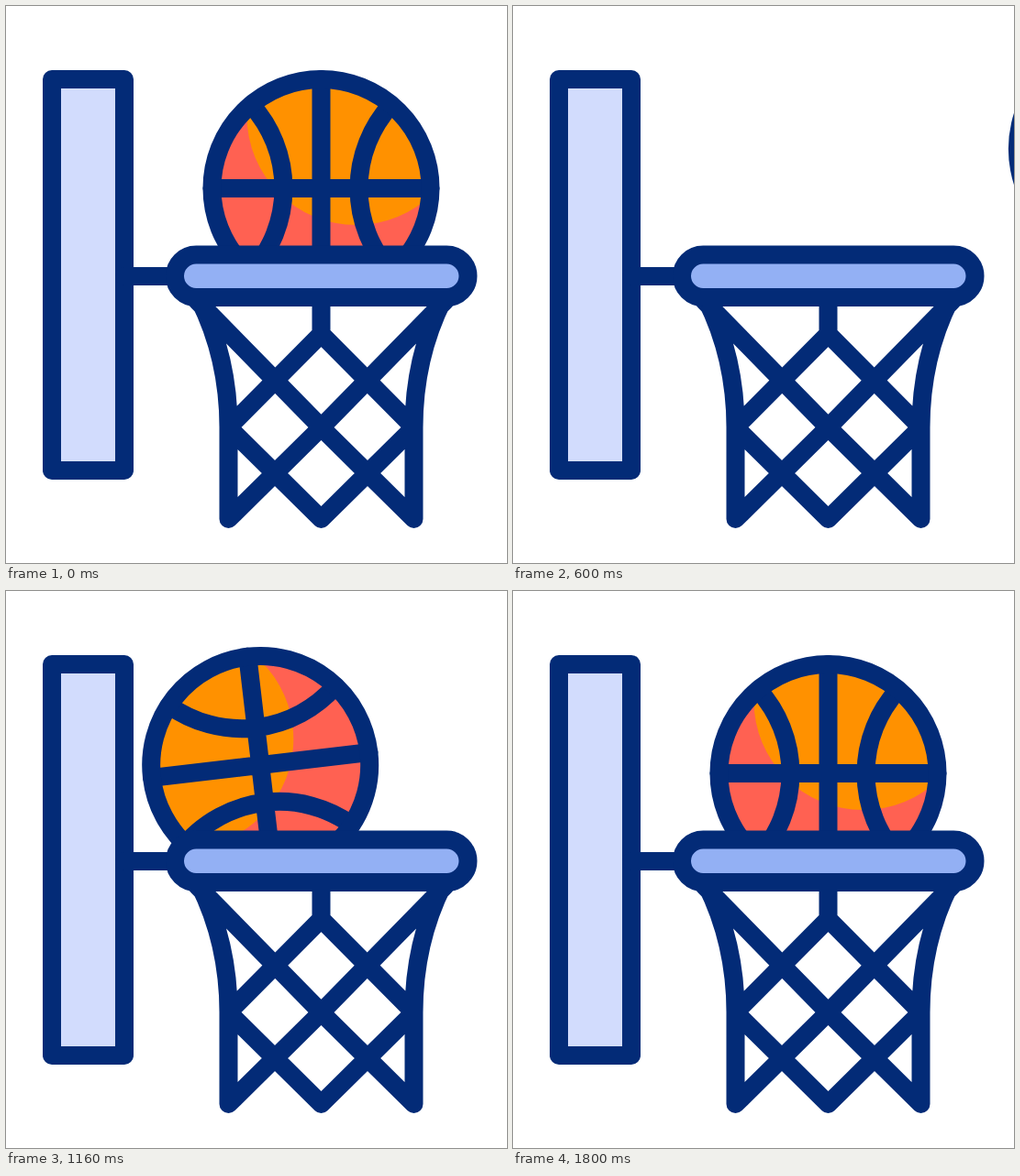
An HTML page that plays this animation: 546 px wide and 608 px high, repeating every 2000 ms.

```html
<!DOCTYPE html>
<html lang="en">
<head>
<meta charset="utf-8">
<title>Basketball hoop</title>
<style>
  html, body { margin: 0; width: 100%; height: 100%; overflow: hidden; background: #fff; }
  svg { display: block; width: 546px; height: 608px; }
  .line { fill: none; stroke: #032b77; stroke-width: 20; stroke-linecap: round; stroke-linejoin: round; }
</style>
</head>
<body>
<svg viewBox="0 0 546 608">
  <defs><clipPath id="inside"><circle r="119"/></clipPath></defs>
  <rect class="line" x="50" y="80" width="79" height="427" style="fill:#d2dcfd"/>
  <path class="line" d="M129 295H184"/>
  <g id="ball">
    <circle r="119" fill="#ff6152"/>
    <circle cx="38" cy="-79" r="119" fill="#ff9100" clip-path="url(#inside)"/>
    <path class="line" d="M0-119V119M-119 0H119M-76-91A136 136 0 0 1-76 91M76-91A136 136 0 0 0 76 91"/>
    <circle class="line" r="119"/>
  </g>
  <path class="line" id="net"/>
  <rect class="line" x="184" y="271.5" width="319.5" height="46.5" rx="23.25" style="fill:#93b0f4"/>
</svg>
<script>
const LOOP = 2000, STEP = 40, CENTER = 343.5;
const ball = document.getElementById('ball');
const net = document.getElementById('net');

const progress = (t, from, to) => Math.min(1, Math.max(0, (t - from) / (to - from)));
const smooth = u => u * u * (3 - 2 * u);
const mix = (a, b, u) => a + (b - a) * u;

function ballPose(t) {
  // Drop through the net
  if (t < 520) {
    const elapsed = Math.max(0, t - 80);
    return [CENTER, 199 + 96.5 * (elapsed / 120) ** 1.75, elapsed * 0.094];
  }
  // Thrown in from the right, bouncing off the board
  const flight = (t - 600) / 40;
  const y = t < 1000
    ? 156 - 25.1 * flight + 2.85 * flight * flight
    : mix(190, 199, smooth(progress(t, 1280, 1720)));
  if (t < 880) {
    const u = progress(t, 520, 880);
    return [254 + 580 * (1 - u) ** 1.333, y, -145 * u];
  }
  // Rolling back along the rim
  const u = progress(t, 880, 1720);
  return [mix(254, CENTER, smooth(u)), y, mix(-145, 0, u)];
}

function netPath(halfWidth) {
  const side = sign => {
    const x = offset => CENTER + sign * offset;
    return `M${x(133)} 320C${x(halfWidth + 9.5)} 365 ${x(halfWidth)} 415 ${x(halfWidth)} 460` +
      `V560L${CENTER} 460L${x(135)} 322` +
      `M${CENTER} 358L${x(halfWidth)} 460L${CENTER} 560`;
  };
  return side(-1) + side(1) + `M${CENTER} 318V358`;
}

function draw(now) {
  const t = Math.floor(now % LOOP / STEP) * STEP;
  const [x, y, angle] = ballPose(t);
  ball.setAttribute('transform', `translate(${x} ${y}) rotate(${angle})`);
  const stretch = smooth(progress(t, 80, 320)) - smooth(progress(t, 320, 560));
  net.setAttribute('d', netPath(101 + 25 * stretch));
}

function frame() {
  draw(performance.now());
  requestAnimationFrame(frame);
}
frame();
</script>
</body>
</html>
```
